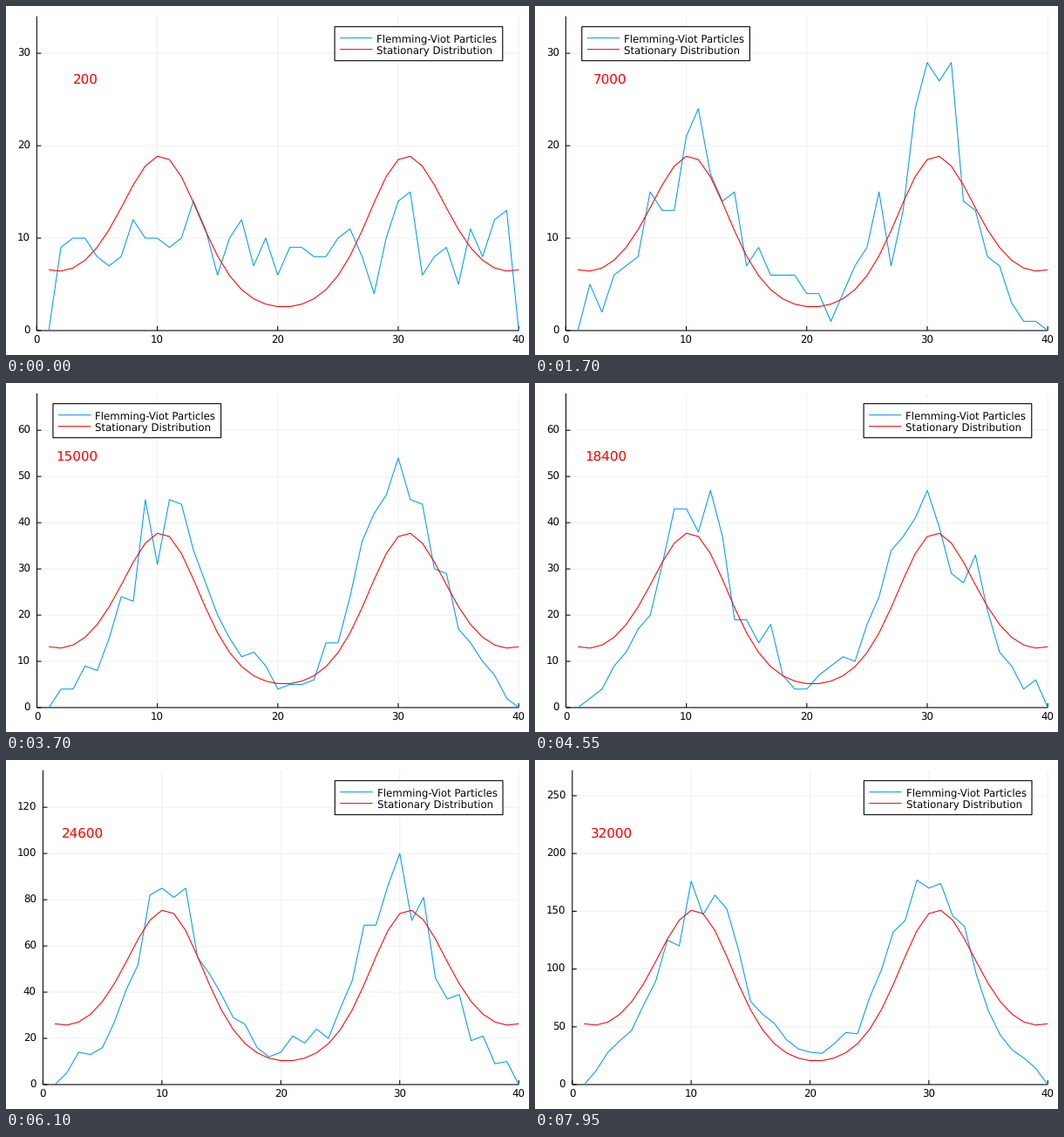
These frames come from a looping animation (600x400 px, 8000 ms). A matplotlib script:

```python
import numpy as np
import matplotlib.pyplot as plt
from matplotlib.animation import FuncAnimation
from matplotlib.patches import Rectangle

W, H, DPI = 600, 400, 100
FRAMES, STEP, STAGE = 160, 50, 50
PX = 72 / DPI                      # one pixel in points
BLUE, RED, GRID = "#009afa", "#ff0000", "#f0f0f0"
TOP, BOTTOM, RIGHT = 11.8, 372.0, 588.2
LEFTS = [35.3, 35.5, 42.4, 42.8]   # left axis edge for each population size
TICK_STEPS = [10, 10, 20, 50]
SITES = np.arange(1, 41)

plt.rcParams["font.family"] = "DejaVu Sans"
plt.rcParams["text.hinting"] = "none"


def stationary(x):
    """Two wells: log density made of cosines, symmetric about the middle."""
    u = np.abs(x - 20.5)
    phi = np.pi * u / 10.2
    inner = 1.94 - np.cos(phi) + 0.027 * np.sin(phi) ** 2
    outer = 2.40 + 0.54 * np.cos(np.pi * (u - 10.2) / 8.5)
    return np.exp(np.where(u < 10.2, inner, outer))


def scale_at(i):
    return 2 ** (i // STAGE)


def simulate():
    """Particle counts: uniform start relaxing to the killed walk's profile."""
    rng = np.random.default_rng(7)
    x = SITES[1:-1]
    survive = np.sin(np.pi * (x - 1) / 39) ** 0.65 * (1 + 0.006 * (x - 20))
    settled = stationary(x) * survive
    settled *= 400 / settled.sum()
    bump = np.exp(-((x - 30.5) / 1.5) ** 2)

    counts = np.zeros((FRAMES, 40))
    z = rng.normal(size=38)
    for i in range(FRAMES):
        s = scale_at(i)
        # a larger population changes more slowly and wobbles less
        keep = np.exp(-1 / (4 * s))
        z = keep * z + rng.normal(size=38) * np.sqrt((1 - keep ** 2) / s)
        # the right well overfills now and then while the population is small
        surge = np.cos(np.pi * (i - 34) / 20) * np.exp(-(i / 95) ** 6)
        base = settled + (10 - settled) * np.exp(-i / 10)
        y = base + 0.8 * np.sqrt(base) * z + 5 * max(surge, 0) * bump
        y = np.clip(y, 0, 25 + 8 * max(surge, 0))
        counts[i, 1:-1] = np.round(y * s)
    return counts


counts = simulate()
fig = plt.figure(figsize=(W / DPI, H / DPI), dpi=DPI, facecolor="white")
ax = fig.add_axes([0, 0, 1, 1])


def line(x, y, color, z=2, width=1.05):
    ax.plot(x, y, color=color, lw=width * PX, zorder=z, snap=False,
            solid_capstyle="butt", solid_joinstyle="round")


def label(x, y, s, ha="left", size=11.8, color="black", z=7):
    ax.text(x, y, s, ha=ha, va="baseline", fontsize=size * PX, color=color, zorder=z)


def legend(x):
    top, width, row = 23.7, 192.7, 13
    ax.add_patch(Rectangle((x, top), width, 3 * row, fc="white", ec="black",
                           lw=1.1 * PX, zorder=5, snap=False))
    names = [(BLUE, "Flemming-Viot Particles"), (RED, "Stationary Distribution")]
    for k, (color, name) in enumerate(names, 1):
        y = top + k * row
        line([x + 6, x + 43.3], [y, y], color, z=6)
        label(x + 48.2, y + 4.5, name)


def draw(i):
    ax.cla()
    ax.set(xlim=(0, W), ylim=(H, 0))
    ax.axis("off")
    stage, scale = i // STAGE, scale_at(i)
    left, ymax = LEFTS[stage], 34 * scale

    def px(x):
        return left + (RIGHT - left) * x / 40

    def py(y):
        return BOTTOM - (BOTTOM - TOP) * y / ymax

    for v in range(0, 41, 10):
        x = px(v)
        line([x, x], [TOP, BOTTOM], GRID, z=0)
        line([x, x], [BOTTOM, BOTTOM - 5], "black", z=1)
        label(x, 387.3, str(v), "center")
    for v in range(0, ymax, TICK_STEPS[stage]):
        y = py(v)
        line([left, RIGHT], [y, y], GRID, z=0)
        line([left, left + 5], [y, y], "black", z=1)
        label(left - 7.6, y + 3.7, str(v), "right")
    line([left, left], [TOP, BOTTOM], "black", z=1)
    line([left, RIGHT], [BOTTOM, BOTTOM], "black", z=1)

    line(px(SITES), py(counts[i]), BLUE, z=2)
    line(px(SITES), py(stationary(SITES) * scale), RED, z=3)
    label(px(5) + 1, 89, str(200 * (i + 1)), "right", 15.1, RED, 4)

    # The legend leaves the right corner when a peak reaches into it
    high = counts[i] >= 0.75 * ymax
    crowded = high[SITES >= 30].sum() > high[SITES <= 10].sum()
    inset = (RIGHT - left) / 30
    legend(left + inset if crowded else RIGHT - inset - 192.7)
    return []


anim = FuncAnimation(fig, draw, frames=FRAMES, init_func=lambda: draw(0),
                     interval=STEP, repeat=True, repeat_delay=0, blit=False)
plt.show()
```
